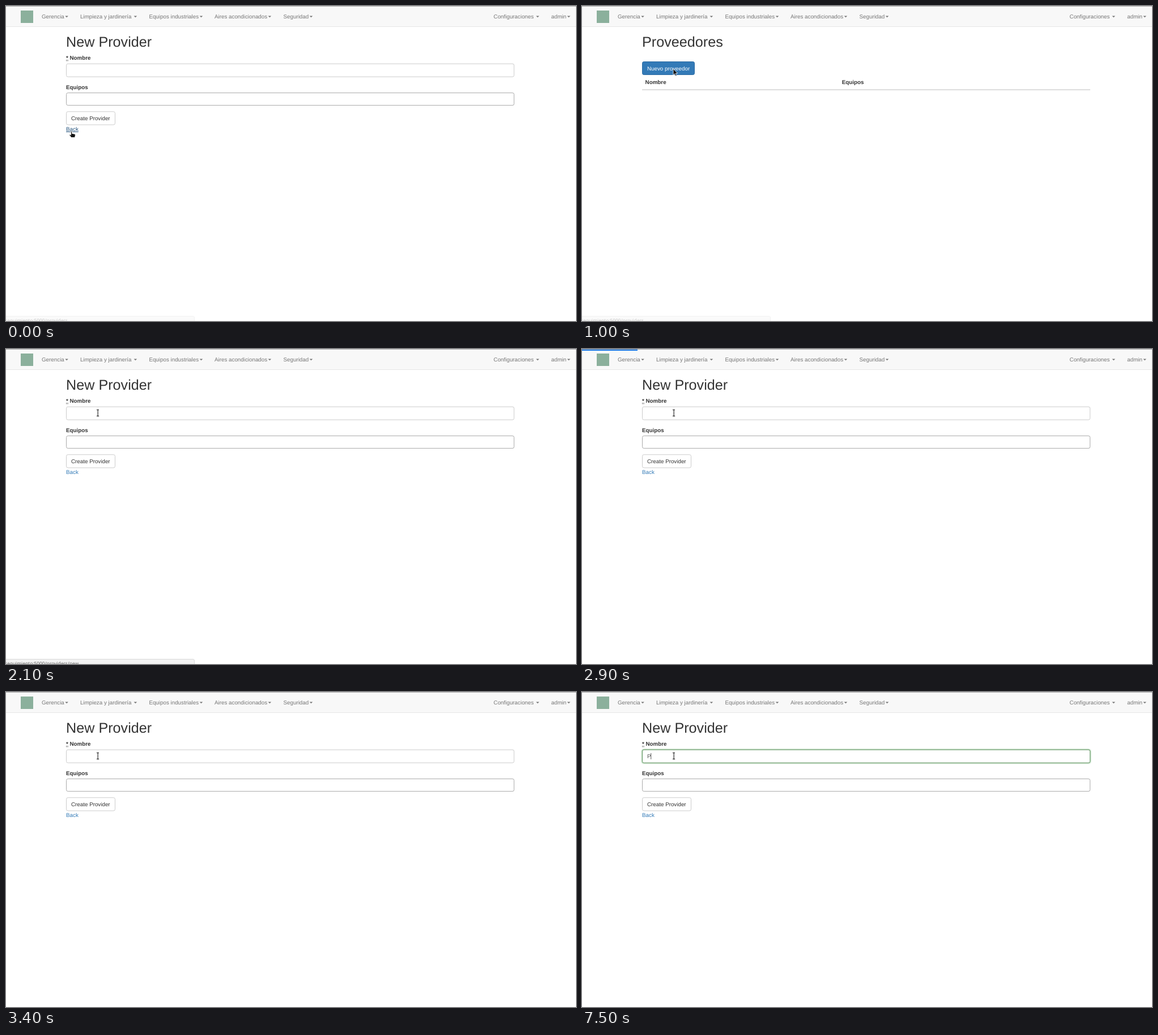
An HTML page for the animation above (8000 ms loop, 1006 px wide and 557 px high).

```html
<!DOCTYPE html>
<html lang="es">
<head>
<meta charset="utf-8">
<title>Proveedores</title>
<style>
  html, body { margin: 0; width: 100%; height: 100%; overflow: hidden; background: #fff; }
  svg { display: block; width: 1006px; height: 557px; }
  text { font: 9.8px "Liberation Sans", Arial, sans-serif; fill: #333; text-rendering: geometricPrecision; white-space: pre; }
  .title { font-size: 25.2px; }
  .bold { font-weight: bold; }
  #nav text { fill: #777; }
  #nav path { fill: #777; }
  .field { fill: #fff; stroke: #ccc; }
  #glow { fill: none; stroke: #67b168; }
  #status text { font: 8.4px "Noto Sans", sans-serif; fill: #666; }
</style>
</head>
<body>
<svg viewBox="0 0 1006 557">
  <rect width="1006" height="36" fill="#f8f8f8"/>
  <rect y="36" width="1006" height="1" fill="#e7e7e7"/>
  <rect width="1006" height="1" fill="#aaa"/>
  <rect x="26" y="8" width="22" height="22" fill="#8bb09c"/>
  <g id="nav"></g>

  <g id="list">
    <text class="title" x="106" y="72.2">Proveedores</text>
    <rect id="newButton" x="106.5" y="98.5" width="92" height="23" rx="2.8"/>
    <text x="115" y="114" style="fill:#fff">Nuevo proveedor</text>
    <text class="bold" x="111.6" y="138.2">Nombre</text>
    <text class="bold" x="458.8" y="138.2">Equipos</text>
    <rect x="106" y="147.4" width="791" height="1.4" fill="#d0d0d0"/>
  </g>

  <g id="form">
    <text class="title" x="106" y="72.2">New Provider</text>
    <text class="bold" x="106" y="94.8">* Nombre</text>
    <path d="M106 95.6h4M106 97h4" stroke="#555" stroke-width=".8" stroke-dasharray="1 .6"/>
    <rect class="field" x="106.5" y="102.2" width="790.2" height="23" rx="2.8"/>
    <g id="glow">
      <rect x="106.5" y="102.2" width="790.2" height="23" rx="2.8" stroke-width="5" opacity=".14"/>
      <rect x="106.5" y="102.2" width="790.2" height="23" rx="2.8" stroke-width="3" opacity=".28"/>
      <rect x="106.5" y="102.2" width="790.2" height="23" rx="2.8" fill="#fff" stroke="#649565"/>
    </g>
    <text id="typed" x="115" y="117.4" style="fill:#555"></text>
    <rect id="caret" y="108" width=".8" height="11" fill="#333"/>
    <text class="bold" x="106" y="146.7">Equipos</text>
    <rect class="field" x="106.5" y="153.6" width="790.2" height="22" rx="2.8" style="stroke:#aaa"/>
    <rect class="field" x="106.5" y="186.8" width="86" height="23.2" rx="2.8"/>
    <text x="115" y="202">Create Provider</text>
    <text id="back" x="106" y="221">Back</text>
  </g>

  <g id="status">
    <rect x="-4" y="548.5" width="336.5" height="14" rx="2.5" fill="#f2f2f2" stroke="#d2d2d2" stroke-width=".8"/>
    <text id="address" x="-2" y="559"></text>
  </g>
  <rect id="bar" y="1" height="2" fill="#1a78e6"/>

  <!-- pointers, each with its hot spot at 0,0 -->
  <g id="pointer">
    <path id="hand" d="M-1 .4Q0 -.8 1 .4V4L5.5 4.8Q7.2 5.2 6.8 7.4L6 11H-.2L-3.4 7Q-3.8 5.2-2 6L-1 6.8Z" fill="#111" stroke="#fff" stroke-width=".8"/>
    <path id="arrow" d="M0 0V11L2.5 8.7L4.3 12.8L6.2 12L4.4 8H7.8Z" fill="#111" stroke="#fff" stroke-width=".8"/>
    <g id="beam" fill="none">
      <path d="M-2-5.5H2M0-5.5V5.5M-2 5.5H2" stroke="#fff" stroke-width="2.4"/>
      <path d="M-1.4 6.2H2.6M1-5V5" stroke="#bbb" stroke-width=".8"/>
      <path d="M-2-5.5H2M0-5.5V5.5M-2 5.5H2" stroke="#222"/>
    </g>
  </g>
</svg>
<script>
const LOOP = 8000;
const $ = id => document.getElementById(id);
const set = (id, attrs) => {
  for (const name in attrs) $(id).setAttribute(name, attrs[name]);
};
const show = (id, on) => set(id, { visibility: on ? "visible" : "hidden" });

// Last value whose start time has been reached
const pick = (t, ...steps) => steps.filter(([start]) => start <= t).pop()[1];

// Label, text x, caret x
const menus = [
  ["Gerencia", 63, 104.3], ["Limpieza y jardinería", 131, 225.6],
  ["Equipos industriales", 252.4, 341.7], ["Aires acondicionados", 368, 462.6],
  ["Seguridad", 489.5, 535.7], ["Configuraciones", 860.6, 935.5], ["admin", 962.3, 990.4],
];
$("nav").innerHTML = menus.map(([label, x, caret]) =>
  `<text x="${x}" y="21.9">${label}</text><path d="M${caret} 17.4h5.6l-2.8 2.8z"/>`).join("");

function draw(t) {
  const onList = t >= 300 && t < 2100;
  show("list", onList);
  show("form", !onList);

  const pressed = t >= 1600;
  set("newButton", { fill: pressed ? "#264d77" : "#337ab7", stroke: pressed ? "#122b40" : "#2e6da4" });
  const hover = t < 300;
  $("back").style.fill = hover ? "#23527c" : "#337ab7";
  $("back").style.textDecoration = hover ? "underline" : "none";

  // The pointer travels from the link to the button in 100 ms steps
  const shape = pick(t, [0, "hand"], [700, "arrow"], [1600, "hand"], [1800, "beam"]);
  for (const id of ["hand", "arrow", "beam"]) $(id).style.display = id === shape ? "" : "none";
  const k = Math.max(0, Math.min(4, Math.floor((t - 600) / 100))) / 4;
  const move = k * (2 - k);
  const [x, y] = shape === "beam" ? [162, 113] : [115.5 + 45.5 * move, 221.5 - 110.5 * move];
  set("pointer", { transform: `translate(${x} ${y})` });

  $("address").textContent = "seguimiento:5000/providers" + (pressed ? "/new" : "");
  set("status", { opacity: pick(t, [0, .35], [300, 1], [700, .85], [800, .7], [900, .5], [1000, .35],
    [1200, .15], [1300, 0], [1600, 1], [2400, .5], [2600, 0]) });
  set("bar", { width: pick(t, [0, 0], [1200, 60], [1300, 97], [1600, 0],
    [2400, 60], [2600, 97], [2900, 98], [3100, 240], [3200, 582], [3400, 0]) });

  set("glow", { opacity: pick(t, [0, 0], [3000, .35], [3100, .8], [3200, 0],
    [6500, .03], [6600, .4], [6700, .9], [6900, 1]) });
  $("typed").textContent = t >= 7500 ? "P" : "";
  show("caret", pick(t, [0, false], [6500, !onList], [7100, false], [7500, true]));
  set("caret", { x: t >= 7500 ? 121.4 : 115.1 });
}

function tick() {
  draw(performance.now() % LOOP);
  requestAnimationFrame(tick);
}
tick();
</script>
</body>
</html>
```
